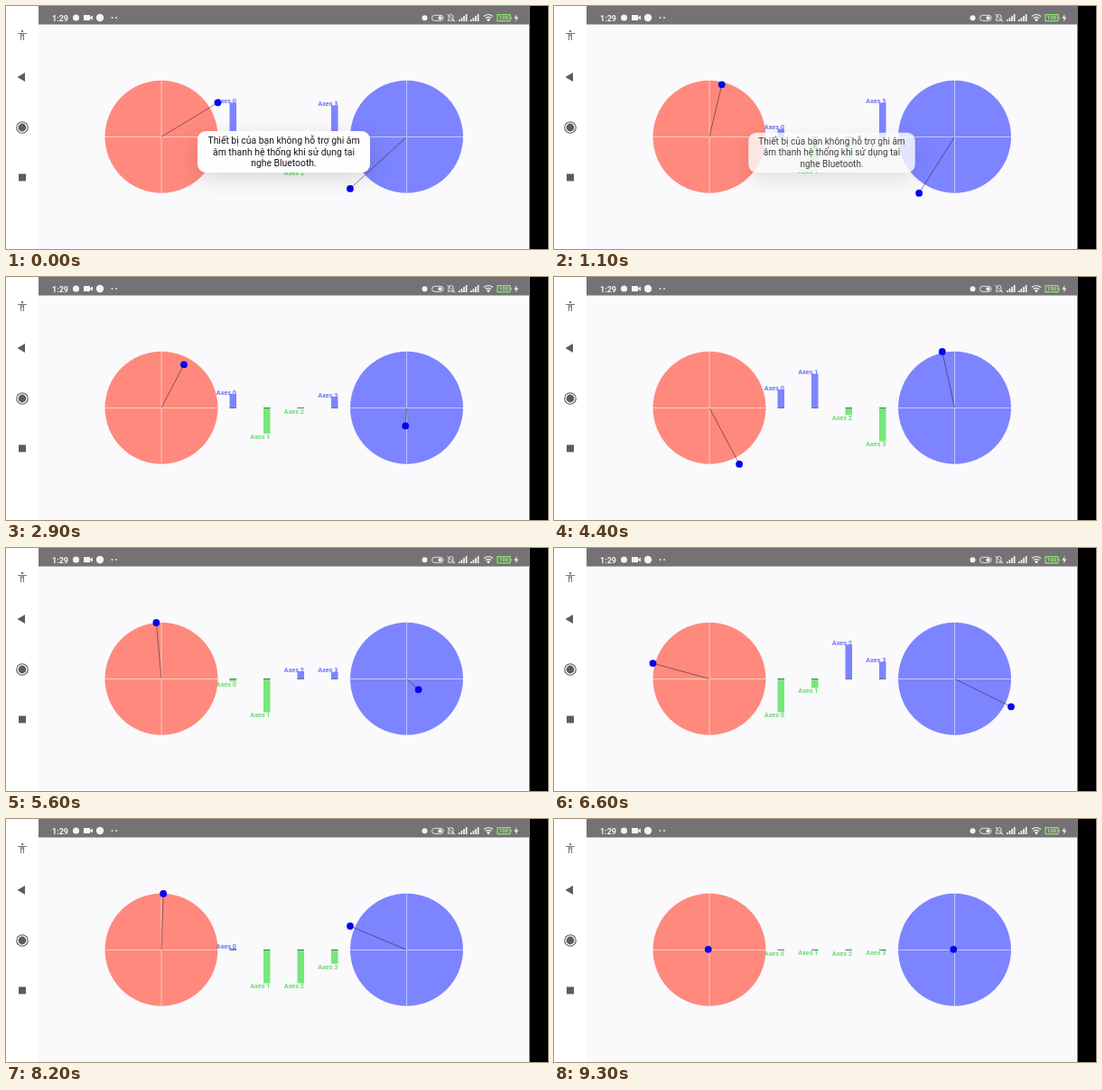
Animation of 600 by 270 pixels, one loop 9500 ms. Source, as an HTML page with a canvas:

```html
<!DOCTYPE html>
<html lang="vi">
<head>
<meta charset="utf-8">
<style>
  html, body { margin: 0; width: 100%; height: 100%; overflow: hidden; background: #faf9fc; }
  canvas { display: block; }
</style>
</head>
<body>
<canvas id="stage" width="600" height="270"></canvas>
<script>
const ctx = document.getElementById('stage').getContext('2d');
const LOOP = 9500, LAST = 9300, STEP = 100, TURN = Math.PI * 2;
const RED = '#ff897d', BLUE = '#7d84ff', GREEN = '#76e77b', PAPER = '#faf9fc';
const MID = 145, RADIUS = 62.5, BAR = 37.5;

// Poses the sticks pass through: position in -1..1, y pointing down
const poses = [
  { t: 0, left: [1, -.61], right: [-1, .92] },
  { t: 1100, left: [.22, -.93], right: [-.63, 1] },
  { t: 2900, left: [.4, -.77], right: [-.02, .32] },
  { t: 4400, left: [.53, 1], right: [-.22, -1] },
  { t: 5600, left: [-.09, -1], right: [.21, .19] },
  { t: 7400, left: [.65, 1], right: [.44, -1] },
  { t: LAST, left: [-.02, -.01], right: [-.02, -.01] }
];

const clamp = v => Math.max(-1, Math.min(1, v));

// Sweep round from pose to pose, one extra turn each, pushing out to the square limit
function stickAt(side, t) {
  const next = Math.max(1, poses.findIndex(pose => pose.t >= t));
  const from = poses[next - 1], to = poses[next];
  const u = (t - from.t) / (to.t - from.t);
  const [x0, y0] = from[side], [x1, y1] = to[side];
  const a0 = Math.atan2(y0, x0), a1 = Math.atan2(y1, x1);
  const angle = a0 + u * ((a1 - a0 + TURN) % TURN + TURN);
  const r0 = Math.hypot(x0, y0), r1 = Math.hypot(x1, y1);
  const radius = r0 + (r1 - r0) * u + .6 * Math.sin(Math.PI * u);
  return [clamp(radius * Math.cos(angle)), clamp(radius * Math.sin(angle))];
}

function rect(color, x, y, w, h) {
  ctx.fillStyle = color;
  ctx.fillRect(x, y, w, h);
}

function disc(color, x, y, r) {
  ctx.fillStyle = color;
  ctx.beginPath();
  ctx.arc(x, y, r, 0, TURN);
  ctx.fill();
}

function path(d, color, width) {
  const shape = new Path2D(d);
  if (width) {
    ctx.strokeStyle = color;
    ctx.lineWidth = width;
    ctx.stroke(shape);
  } else {
    ctx.fillStyle = color;
    ctx.fill(shape);
  }
}

function text(str, x, y, size, color, weight = 400, align = 'left') {
  ctx.font = `${weight} ${size}px Roboto, sans-serif`;
  ctx.fillStyle = color;
  ctx.textAlign = align;
  ctx.fillText(str, x, y);
}

function drawNavigation() {
  const gray = '#5c5c5e', light = '#7c7c7e';
  rect('#fff', 0, 0, 36, 270);
  rect('#000', 579.5, 0, 21, 270);
  disc(light, 18, 28, 1.3);
  path('M13 30.5H23M18 30.5V34M16.5 31V38M19.5 31V38', light, 1.1);
  path('M12.5 79L21 74V84Z', gray);
  disc(gray, 18, 135, 6.8);
  disc('#fff', 18, 135, 5.7);
  disc(gray, 18, 135, 4.4);
  rect(gray, 14, 186.5, 8, 8);
}

function drawStatusBar() {
  const white = '#f4f3f4', green = '#8ee66d';
  rect('#757276', 36, 0, 543.5, 20.5);
  text('1:29', 51, 16.5, 9, white, 700);
  disc(white, 77.5, 13, 3.5);
  path('M86 10H93V16H86ZM93 12.5L96 10.5V15.5L93 13.5Z', white);
  disc(white, 104, 13, 4.2);
  disc(white, 117.5, 13, .9);
  disc(white, 122, 13, .9);

  disc(white, 463.5, 13.3, 3);
  path('M474.5 10.3H481A3 3 0 0 1 481 16.3H474.5A3 3 0 0 1 474.5 10.3Z', white, .9);
  disc(white, 480.5, 13.3, 2);
  path('M489 16H496L495 14.5V12A2.5 2.5 0 0 0 490 12V14.5ZM488.5 9L497 17.5', white, .9);
  for (const x of [501, 514]) {
    for (let i = 0; i < 4; i++) rect(white, x + i * 2.6, 15 - i * 2, 1.7, 2 + i * 2);
  }
  path('M529 11.5Q534 7.5 539 11.5M530.8 13.6Q534 11 537.2 13.6', white, 1.2);
  path('M532 15L534 13.7L536 15L534 17.5Z', white);
  path('M544 9.7H558V16.7H544Z', green, 1.2);
  rect(green, 558.5, 12, 1.2, 2.5);
  text('100', 551, 15.4, 6, '#a5f286', 700, 'center');
  path('M565.5 9L562.5 13.7H564.7L564 17.5L567.3 12.4H565Z', white);
}

function drawAxis(index, value) {
  const x = 247.5 + index * 37.5, end = MID - value * BAR, up = value > 0;
  rect(up ? BLUE : GREEN, x, Math.min(MID, end), 7.5, Math.abs(end - MID));
  rect('#4b5a50', x, MID, 7.5, .8);
  text('Axes ' + index, x - 14.7, end + (up ? .5 : 5.9), 7.3, up ? '#7278f2' : '#68df6e', 700);
}

function drawPad(cx, color) {
  disc(color, cx, MID + .3, RADIUS);
  rect('rgba(255,255,255,.55)', cx - .5, MID - RADIUS, 1, RADIUS * 2);
  rect('rgba(255,255,255,.55)', cx - RADIUS, MID, RADIUS * 2, 1);
}

function drawStick(cx, [x, y]) {
  const px = cx + x * RADIUS, py = MID + .4 + y * RADIUS;
  path(`M${cx} ${MID + .4}L${px} ${py}`, 'rgba(35,25,35,.85)', .6);
  disc('#0505ee', px, py, 3.9);
}

// Fades and shrinks away after one second
function drawToast(t) {
  const p = Math.max(0, (t - 1000) / 230);
  if (p >= 1) return;
  const scale = 1 - .08 * p;
  ctx.save();
  ctx.globalAlpha = 1 - p * p;
  ctx.translate(307.5, 162 + 2 * p);
  ctx.scale(scale, scale);
  ctx.save();
  ctx.shadowColor = 'rgba(0,0,0,.13)';
  ctx.shadowBlur = 24;
  ctx.shadowOffsetY = 8;
  ctx.fillStyle = '#fefefe';
  ctx.beginPath();
  ctx.roundRect(-95.5, -23, 191, 46, 9);
  ctx.fill();
  ctx.restore();
  ['Thiết bị của bạn không hỗ trợ ghi âm', 'âm thanh hệ thống khi sử dụng tai', 'nghe Bluetooth.']
    .forEach((line, i) => text(line, 0, -9 + i * 12.7, 10.4, '#161616', 400, 'center'));
  ctx.restore();
}

function draw(now) {
  const t = Math.min(LAST, Math.floor(now % LOOP / STEP) * STEP);
  const left = stickAt('left', t), right = stickAt('right', t);
  rect(PAPER, 0, 0, 600, 270);
  drawNavigation();
  drawStatusBar();
  drawPad(172, RED);
  drawPad(443.5, BLUE);
  [...left, ...right].forEach((value, i) => drawAxis(i, value));
  drawStick(172, left);
  drawStick(443.5, right);
  drawToast(t);
}

const start = performance.now();
function tick() {
  draw(performance.now() - start);
  requestAnimationFrame(tick);
}
tick();
</script>
</body>
</html>
```
